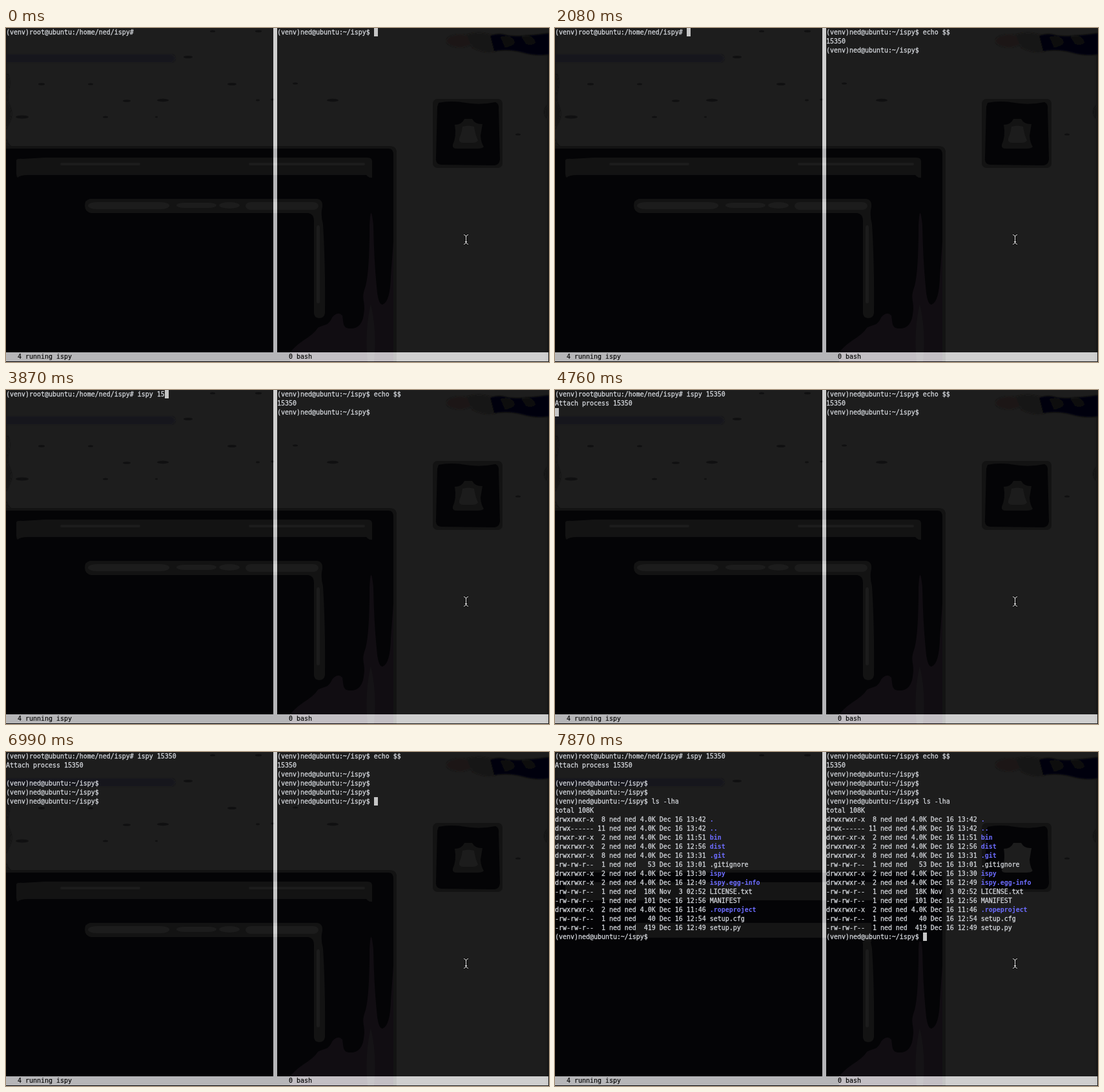
Recreate the animation shown at these times as an HTML page. Size 841 by 518 pixels, loop 8 s.

```html
<!DOCTYPE html>
<html lang="en">
<meta charset="utf-8">
<title>Shared shell</title>
<style>
  html, body { margin: 0; width: 100%; height: 100%; overflow: hidden; background: #000 }
  svg, pre, .bar { position: absolute; margin: 0; left: 0; top: 0 }
  pre { font: 9.966px/14px "DejaVu Sans Mono", monospace; color: #d2d5da; white-space: pre; -webkit-text-stroke: .3px }
  pre b { color: #6c6cff; -webkit-text-stroke: 0 }
  pre i { display: inline-block; width: 6px; height: 13px; vertical-align: top; background: #c6c6c6 }
  #right { left: 420px }
  .bar { background: #b2b2b2; mix-blend-mode: plus-lighter }
  .divider { left: 414px; width: 6px; height: 503px }
  .status { top: 503px; width: 840px; height: 14px }
  .label { top: 503px; color: #000; -webkit-text-stroke: .15px }
</style>
<body>
<svg width="841" height="518" viewBox="0 0 841 518">
  <defs>
    <filter id="soft"><feGaussianBlur stdDeviation="1.2"/></filter>
  </defs>
  <rect width="841" height="518" fill="#1d1d1d"/>
  <path d="M0 0H2V70Q8 82 4 96T6 122T4 148T2 178L8 185H0ZM841 40H838V120Q830 131 838 140V518H841Z" fill="#121212" filter="url(#soft)"/>
  <rect x="-8" y="41" width="270" height="12" rx="6" fill="#17171e" filter="url(#soft)"/>
  <g id="specks" fill="#101011"></g>

  <g filter="url(#soft)">
    <ellipse cx="703" cy="20" rx="21" ry="10" fill="#1a1916"/>
    <path d="M714 10Q734 4 756 12L760 36Q738 40 722 30Z" fill="#181513"/>
    <path d="M750 12Q762 7 775 11T841 8V41Q820 44 800 38T756 36Z" fill="#060608"/>
    <path d="M766 14Q780 10 786 18T773 30ZM798 13Q812 9 818 18T806 25Z" fill="#0b0c0c"/>
  </g>

  <path id="edge" d="M0 183H594Q605 183 605 193V518H0Z" fill="#131313"/>
  <path id="desk" d="M0 187H592Q600 187 600 196V518H0Z" fill="#040406"/>
  <path d="M440 503C458 482 471 482 483 465C493 459 499 463 505 449Q514 438 521 446C523 457 521 466 533 466Q548 467 553 450C559 420 548 425 557 400Q563 376 563 306Q565 268 569 306Q570 360 574 400Q576 429 583 429Q595 425 596 385L600 330V518H440Z" fill="#110d12"/>
  <path d="M560 518Q555 470 565 428Q575 470 570 518Z" fill="#151316"/>

  <g fill="#131313">
    <path d="M16 205Q17 202 26 203L60 201H560Q567 201 567 207V232Q562 233 558 228H34Q22 228 18 232Q16 230 16 226Z"/>
    <path d="M130 265H482Q491 266 490 277Q487 290 491 304Q495 370 494 442Q493 450 485 450Q476 449 477 440V300Q477 288 468 287H132Q122 285 122 275Q122 267 130 265Z"/>
  </g>
  <g fill="#1c1c1c">
    <rect x="84" y="209" width="124" height="4" rx="2"/>
    <rect x="376" y="209" width="180" height="4" rx="2"/>
    <rect x="127" y="270" width="126" height="11" rx="14"/>
    <rect x="264" y="271" width="62" height="8" rx="12"/>
    <ellipse cx="346" cy="275" rx="16" ry="5"/>
    <rect x="371" y="270" width="113" height="12" rx="8"/>
    <rect x="481" y="306" width="5" height="121" rx="2.5"/>
  </g>

  <rect id="rim" x="661" y="110" width="108" height="107" rx="7" fill="#131313"/>
  <path id="frame" d="M670 116Q690 112 712 116T758 115Q764 117 763 126L765 204Q764 213 755 213L674 212Q665 211 666 202L668 122Z" fill="#040406"/>
  <path id="pane" d="M695 150Q706 150 710 141H722Q727 150 738 149L735 167Q736 179 740 184Q738 187 731 187H698Q691 187 692 181Q698 168 695 150Z" fill="#131313"/>
  <path d="M707 153Q716 150 725 153Q727 166 731 174Q730 178 723 178H708Q701 178 702 172Q706 162 707 153Z" fill="#1c1c1c"/>

  <svg id="repaint" y="70" width="739" height="224" viewBox="0 70 739 224" visibility="hidden">
    <rect y="70" width="739" height="224" fill="#1d1d1d"/>
    <use href="#edge"/>
    <use href="#desk"/>
    <path d="M16 202H567V230H16ZM124 265H490V294H477V288H124Z" fill="#151515"/>
    <use href="#rim"/>
    <use href="#frame"/>
    <use href="#pane" style="filter:brightness(1.5)"/>
  </svg>
</svg>

<div class="bar divider"></div>
<div class="bar status"></div>
<pre class="label">   4 running ispy</pre>
<pre class="label" style="left:420px">   0 bash</pre>
<pre id="left"></pre>
<pre id="right"></pre>
<svg width="841" height="518" fill="none">
  <defs>
    <path id="beam" d="M709 320.5Q712.5 321 712.5 324V332Q712.5 335 709 335.5M716 320.5Q712.5 321 712.5 324M712.5 332Q712.5 335 716 335.5M711 331.5H714"/>
  </defs>
  <use href="#beam" stroke="#000" stroke-width="2.5"/>
  <use href="#beam" stroke="#eee"/>
</svg>

<script>
const $ = id => document.getElementById(id);
const LOOP = 8000;
const user = 'ned';
const prompt = `(venv)${user}@ubuntu:~/ispy$ `;
const rootPrompt = `(venv)root@ubuntu:/home/${user}/ispy# `;

// x, y and half width of the wall marks
$('specks').innerHTML = [
  [320, 5, 4], [391, 5, 5], [282, 45, 7], [55, 87, 5], [131, 87, 4], [350, 87, 7],
  [448, 86, 4], [187, 113, 6], [243, 112, 9], [390, 112, 3], [413, 111, 3],
  [506, 112, 9], [25, 138, 10], [154, 138, 4], [233, 138, 2], [793, 165, 4]
].map(([x, y, r]) => `<ellipse cx="${x}" cy="${y}" rx="${r}" ry="${1 + r / 7}"/>`).join('');

const listing = `drwxrwxr-x|8|4.0K|Dec 16 13:42|.
drwx------|11|4.0K|Dec 16 13:42|..
drwxr-xr-x|2|4.0K|Dec 16 11:51|bin
drwxrwxr-x|2|4.0K|Dec 16 12:56|dist
drwxrwxr-x|8|4.0K|Dec 16 13:31|.git
-rw-rw-r--|1|53|Dec 16 13:01|.gitignore
drwxrwxr-x|2|4.0K|Dec 16 13:30|ispy
drwxrwxr-x|2|4.0K|Dec 16 12:49|ispy.egg-info
-rw-rw-r--|1|18K|Nov  3 02:52|LICENSE.txt
-rw-rw-r--|1|101|Dec 16 12:56|MANIFEST
drwxrwxr-x|2|4.0K|Dec 16 11:46|.ropeproject
-rw-rw-r--|1|40|Dec 16 12:54|setup.cfg
-rw-rw-r--|1|419|Dec 16 12:49|setup.py`.split('\n').map(row => {
  const [mode, links, size, date, name] = row.split('|');
  const label = mode[0] === 'd' ? `<b>${name}</b>` : name;
  return `${mode} ${links.padStart(2)} ${user} ${user} ${size.padStart(4)} ${date} ${label}\n`;
}).join('');

// Each step: time, panes written to, output ('\b' erases), pane with the cursor
const both = ['left', 'right'];
const steps = [
  [0, ['left'], rootPrompt, 'right'],
  [0, ['right'], prompt, 'right'],
  ...[[150, 'e'], [300, 'c'], [440, 'ho'], [590, ' '], [1040, '$'], [1190, '$'],
    [1490, '\n15350\n' + prompt]].map(([t, s]) => [t, ['right'], s, 'right']),
  ...[[2080, ''], [2830, 'i'], [2980, 'sp'], [3130, 'y '], [3570, '1'], [3870, '5'],
    [4020, '3'], [4170, '50'], [4610, '\n'], [4760, 'Attach process 15350\n']
  ].map(([t, s]) => [t, ['left'], s, 'left']),
  ...[[5510, ''], [5660, '\n' + prompt], [5810, '\n' + prompt], [5960, '\n' + prompt],
    [6260, 'l'], [6400, 's '], [6700, '\b'], [6850, '\b'], [6990, '\b'],
    [7140, 'l'], [7280, 's '], [7430, '-'], [7580, 'lh'], [7720, 'a'],
    [7870, '\ntotal 108K\n' + listing + prompt]].map(([t, s]) => [t, both, s, 'right'])
];

let shown = -1;
function draw() {
  const time = performance.now() % LOOP;
  const past = steps.filter(([t]) => t <= time);
  if (past.length !== shown) {
    shown = past.length;
    const text = { left: '', right: '' };
    for (const [, panes, output] of past)
      for (const pane of panes)
        text[pane] = output === '\b' ? text[pane].slice(0, -1) : text[pane] + output;
    text[past.at(-1)[3]] += '<i></i>';
    for (const pane of both) $(pane).innerHTML = text[pane];
    $('repaint').setAttribute('visibility', time >= 7870 ? 'visible' : 'hidden');
  }
  requestAnimationFrame(draw);
}
draw();
</script>
</body>
</html>
```
